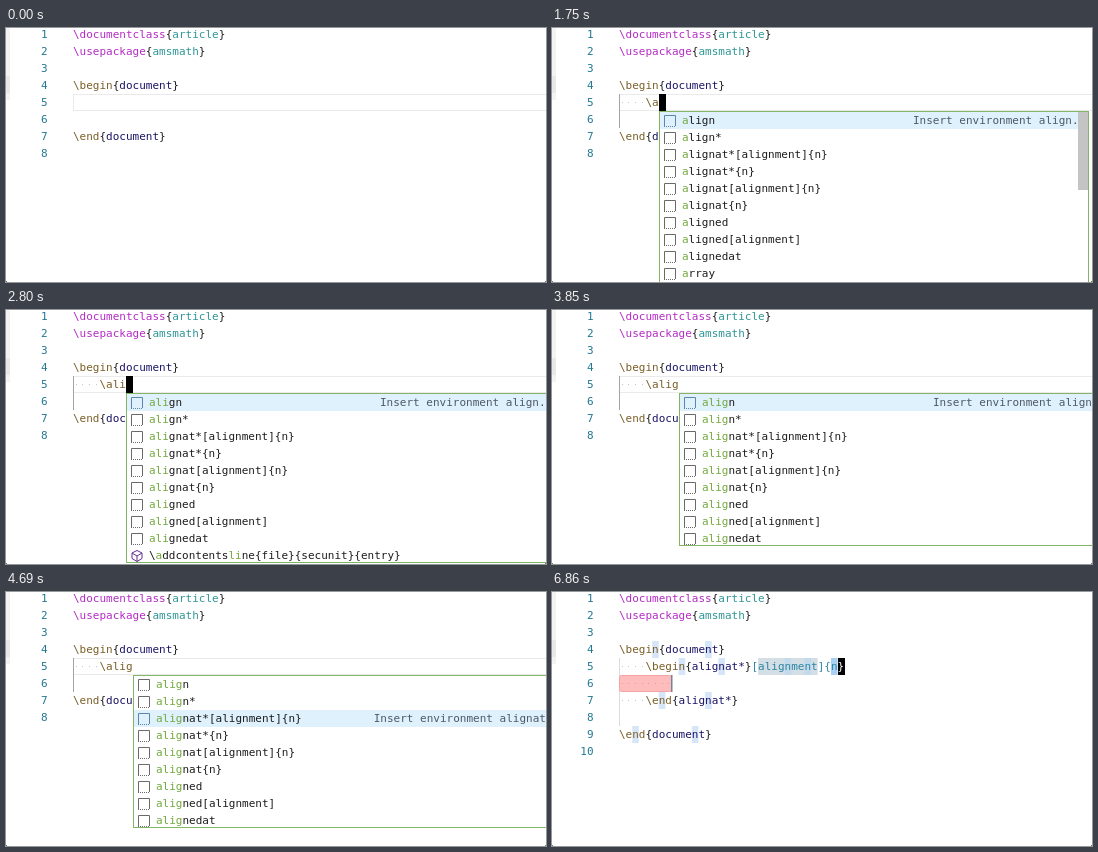
An HTML page with a canvas that plays this animation: 540 px wide and 254 px high, repeating every 7.07 s.

```html
<!DOCTYPE html>
<html lang="en">
<head>
<meta charset="utf-8">
<title>LaTeX completion</title>
<style>
html, body { margin: 0; width: 100%; height: 100%; overflow: hidden; background: #fff; }
canvas { display: block; }
</style>
</head>
<body>
<canvas id="stage" width="540" height="254"></canvas>
<script>
(() => {
const ctx = document.getElementById("stage").getContext("2d");
const LOOP = 7070, LEFT = 67, ROW = 17;
const C = {
  key: "#b32bc4", arg: "#2f9595", cmd: "#795e26", name: "#1a1466", ink: "#1c1c1c",
  num: "#237893", opt: "#2b84a3", match: "#72a83c", dot: "#c6c6c6", pink: "#ffbcbc",
  hit: "#d6e6f8", line: "#eaeaea"
};
const FONT = '11px "DejaVu Sans Mono", Menlo, "Liberation Mono", monospace';
ctx.font = FONT;
const CW = ctx.measureText("0").width;

const ITEMS = ["align", "align*", "alignat*[alignment]{n}", "alignat*{n}",
  "alignat[alignment]{n}", "alignat{n}", "aligned", "aligned[alignment]", "alignedat"];
const TOC = "\\addcontentsline{file}{secunit}{entry}";
const DETAILS = ["align.", "align*.", "alignat."].map(s => "Insert environment " + s);

// [start, typed text] for the current word
const TYPED = [[1400, "\\"], [1610, "\\a"], [2170, "\\al"], [2660, "\\ali"], [3850, "\\alig"]];
const POPUP = 1680, ACCEPT = 5180;
// spans in which the block cursor is hidden
const HIDDEN = [[0, 560], [3220, 3570], [3780, 3920], [4270, 4830], [5320, 5810], [6300, 6860]];

const col = n => LEFT + n * CW;
const rowY = n => ROW * n - 19;

function box(x, y, w, h, color) {
  ctx.fillStyle = color;
  ctx.fillRect(x, y, w, h);
}

function text(x, y, str, color) {
  ctx.fillStyle = color;
  ctx.fillText(str, x, y);
}

function code(n, start, parts) {
  let c = start;
  for (const [str, color] of parts) {
    text(col(c), rowY(n) + 12, str, color);
    c += str.length;
  }
}

function env(n, start, cmd, arg, cmdColor = C.cmd, argColor = C.name) {
  code(n, start, [["\\" + cmd, cmdColor], ["{", C.ink], [arg, argColor], ["}", C.ink]]);
}

function dots(n, count, color = C.dot) {
  for (let i = 0; i < count; i++) box(Math.floor(col(i + 0.5)), rowY(n) + 8, 1, 1, color);
}

function pink(n, cols) {
  ctx.fillStyle = C.pink;
  ctx.strokeStyle = "#f3a3a3";
  ctx.lineWidth = 1;
  ctx.beginPath();
  ctx.roundRect(LEFT + 0.5, rowY(n) + 0.5, cols * CW - 1, ROW - 1, 2);
  ctx.fill();
  ctx.stroke();
}

function block(n, c) {
  box(Math.round(col(c)), rowY(n), 7, ROW, "#000");
}

function hits(n, ...cols) {
  for (const c of cols) box(col(c), rowY(n), CW, ROW, C.hit);
}

function page(lines) {
  box(0, 0, 540, 254, "#fff");
  box(0, 0, 4, 72, "#f3f3f3");
  box(0, 48, 4, 17, "#e8e8e8");
  box(0, 253, 1, 1, "#777");
  box(539, 253, 1, 1, "#777");
  ctx.textAlign = "right";
  for (let i = 1; i <= lines; i++) text(41.5, rowY(i) + 12, String(i), C.num);
  ctx.textAlign = "left";
  env(1, 0, "documentclass", "article", C.key, C.arg);
  env(2, 0, "usepackage", "amsmath", C.key, C.arg);
}

function snippetIcon(x, y, color) {
  ctx.strokeStyle = color;
  ctx.lineWidth = 1;
  ctx.beginPath();
  ctx.moveTo(x + 0.5, y + 11);
  ctx.lineTo(x + 0.5, y + 0.5);
  ctx.lineTo(x + 11.5, y + 0.5);
  ctx.lineTo(x + 11.5, y + 11);
  ctx.stroke();
  for (let i = 0; i < 12; i += 2) box(x + i, y + 11, 1, 1, color);
}

function cubeIcon(x, y) {
  const p = [[6, 0.5], [11, 3], [11, 8.5], [6, 11.5], [1, 8.5], [1, 3]];
  ctx.strokeStyle = "#652d90";
  ctx.lineWidth = 1;
  ctx.beginPath();
  p.forEach(([a, b]) => ctx.lineTo(x + a, y + b));
  ctx.closePath();
  ctx.moveTo(x + 1, y + 3);
  ctx.lineTo(x + 6, y + 6);
  ctx.lineTo(x + 11, y + 3);
  ctx.moveTo(x + 6, y + 6);
  ctx.lineTo(x + 6, y + 11.5);
  ctx.stroke();
}

function label(x, y, str, word) {
  let k = 0;
  [...str].forEach((ch, i) => {
    const on = k < word.length && ch === word[k];
    if (on) k++;
    text(x + i * CW, y, ch, on ? C.match : C.ink);
  });
}

function popup(word, selected) {
  const x = Math.round(col(5 + word.length)), y = 83, w = 430;
  const scrolls = word === "a";
  const extra = scrolls ? ["array", "arraycolsep"] : word.length < 4 ? [TOC] : [];
  const rows = ITEMS.concat(extra);
  const h = rows.length * ROW;
  box(x, y, w, h, "#fff");
  box(x + 1, y + 1 + selected * ROW, w - 2, ROW, "#def1fd");
  rows.forEach((item, i) => {
    const ry = y + 1 + i * ROW;
    if (item === TOC) cubeIcon(x + 5, ry + 3);
    else snippetIcon(x + 5, ry + 3, i === selected ? "#5f86a8" : "#6a6a6a");
    label(x + 23, ry + 12, item, word);
  });
  const detail = DETAILS[selected];
  text(x + 419.5 - detail.length * CW, y + 13 + selected * ROW, detail, "#4d5964");
  if (scrolls) box(x + 419, y + 1, 10, 78, "#c4c4c4");
  ctx.strokeStyle = "#83b565";
  ctx.lineWidth = 1;
  ctx.strokeRect(x + 0.5, y + 0.5, w - 1, h - 1);
}

function typing(t, cursor) {
  const typed = TYPED.reduce((s, [at, str]) => t >= at ? str : s, "");
  const indent = t >= 840 ? 4 : 0;
  const trailing = t >= 1050 && t < 1610;
  page(8);
  box(LEFT, 66, 473, 1, C.line);
  box(LEFT, 82, 473, 1, C.line);
  box(LEFT, 66, 1, ROW, C.line);
  if (typed) box(LEFT, 66, 1, 2 * ROW, "#a4a4a4");
  if (trailing) pink(5, typed ? 5 : 4);
  dots(5, indent, trailing ? "#dd9c9c" : C.dot);
  env(4, 0, "begin", "document");
  env(7, 0, "end", "document");
  code(5, 4, [[typed, C.cmd]]);
  if (cursor) block(5, indent + typed.length);
  if (t >= POPUP) popup(typed.slice(1), t < 4480 ? 0 : t < 4620 ? 1 : 2);
}

function inserted(cursor) {
  page(10);
  hits(4, 5, 13);
  hits(5, 9, 15);
  box(col(21), rowY(5), 9 * CW, ROW, "#d3dfe5");
  box(col(25), rowY(5), CW, ROW, "#c3daec");
  box(col(28), rowY(5), CW, ROW, "#c3daec");
  box(col(32), rowY(5), CW, ROW, "#a9d0f3");
  hits(7, 6, 13);
  hits(9, 2, 11);
  box(LEFT, 66, 1, 68, "#dcdcdc");
  pink(6, 8);
  box(119, 83, 1.5, ROW, "#71869b");
  dots(5, 4);
  dots(6, 8, "#dd9c9c");
  dots(7, 4);
  env(4, 0, "begin", "document");
  env(5, 4, "begin", "alignat*");
  code(5, 20, [["[alignment]{n", C.opt], ["}", C.ink]]);
  env(7, 4, "end", "alignat*");
  env(9, 0, "end", "document");
  if (cursor) {
    block(5, 33);
    code(5, 33, [["}", "#fff"]]);
  }
}

function draw(now) {
  const t = now % LOOP;
  const cursor = !HIDDEN.some(([a, b]) => t >= a && t < b);
  ctx.font = FONT;
  if (t < ACCEPT) typing(t, cursor);
  else inserted(cursor);
}

let begin;
function tick(now) {
  begin ??= now;
  draw(now - begin);
  requestAnimationFrame(tick);
}
draw(0);
requestAnimationFrame(tick);
})();
</script>
</body>
</html>
```
